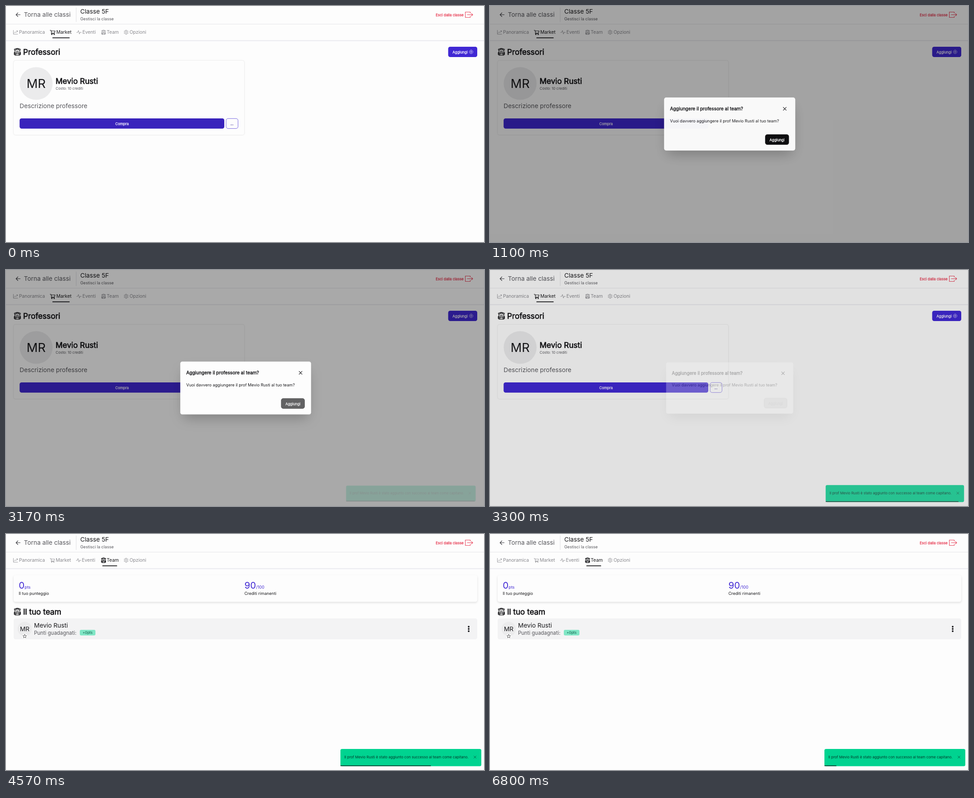
Animation of 1062 by 527 pixels, one loop 6.83 s. Source, as an HTML page:

```html
<!DOCTYPE html>
<html lang="it">
<head>
<meta charset="utf-8">
<title>Classe 5F</title>
<style>
  html, body { margin: 0; width: 100%; height: 100%; overflow: hidden; background: #fdfdfd; }
  svg { display: block; width: 1062px; height: 527px; }
  text { font-family: Inter, "Liberation Sans", sans-serif; white-space: pre; }
  .card { filter: drop-shadow(0 .6px .9px rgba(0, 0, 0, .17)); }
  .raised { filter: drop-shadow(0 2px 2.2px rgba(0, 0, 0, .12)); }
  .btn { filter: drop-shadow(0 .8px .6px rgba(60, 40, 190, .35)); }
</style>
</head>
<body>
<svg id="stage" viewBox="0 0 1062 527" xmlns="http://www.w3.org/2000/svg"></svg>
<script>
const LOOP = 6830, OPEN = 881, PRESS_HOVER = 1510, CLOSE = 3140, SWITCH = 4400;
const TOAST_LIFE = 4000;
const UNIT = 0.572;              // page zoom: one CSS pixel on the stage
const INK = '#18181b', SOFT = '#57575c', MUTED = '#89898e';
const PRIMARY = [64, 40, 212], PRIMARY_HOVER = [57, 35, 188];
const NAME = 'Mevio Rusti';

const rgb = c => `rgb(${c.map(Math.round)})`;
const mix = (a, b, p) => a.map((v, i) => v + (b[i] - v) * p);

// ---- markup helpers ----
function text(x, y, px, str, fill = INK, opts = {}) {
  const size = px * UNIT;
  const bold = opts.bold ? `stroke="${fill}" stroke-width="${(size * 0.042).toFixed(2)}"` : '';
  const id = opts.id ? `id="${opts.id}"` : '';
  return `<text ${id} x="${x}" y="${y}" font-size="${size.toFixed(2)}" fill="${fill}" ${bold}
    text-anchor="${opts.anchor || 'start'}">${str}</text>`;
}
const rect = (x, y, w, h, r, fill, extra = '') =>
  `<rect x="${x}" y="${y}" width="${w}" height="${h}" rx="${r}" fill="${fill}" ${extra}/>`;
const circle = (x, y, r, fill) => `<circle cx="${x}" cy="${y}" r="${r}" fill="${fill}"/>`;
const stroke = (d, color, width, extra = '') =>
  `<path d="${d}" fill="none" stroke="${color}" stroke-width="${width}" ${extra}/>`;

// icons on a 24 unit grid
const ICONS = {
  chart: 'M1 2V22H23M5 16L10 10L14 14L22 5M17 5H22V10',
  cart: 'M0 3H4L7 16H20L23 6H5M7 16L5 19H21M8 21a1.3 1.3 0 1 0 .1 0M19 21a1.3 1.3 0 1 0 .1 0',
  pulse: 'M0 13H5L9 3L14 21L18 11L19.500 13H24',
  bag: 'M8 5V3a2 2 0 0 1 2-2h4a2 2 0 0 1 2 2v2M4 22V10a6 6 0 0 1 6-6h4a6 6 0 0 1 6 6V22a1 1 0 0 1-1 1H5a1 1 0 0 1-1-1Z' +
       'M7 23V16a2 2 0 0 1 2-2h6a2 2 0 0 1 2 2V23M8 10H16M7 18H17M4 14H2V21H4M20 14H22V21H20M4 8L2 4L6 2M20 8L22 4L18 2',
  gear: 'M12 8a4 4 0 1 0 .1 0M10 1.500h4l.7 3 2.600 1.500 3-.9 2 3.500-2.200 2.200v2.600l2.200 2.200-2 3.500-3-.9-2.600 1.500-.7 3h-4' +
        'l-.7-3-2.600-1.500-3 .9-2-3.500 2.200-2.200v-2.600l-2.200-2.200 2-3.500 3 .9 2.600-1.500Z',
  plus: 'M12 2a10 10 0 1 0 .1 0M12 7V17M7 12H17',
  star: 'M12 2L15 9L22.500 9.600L16.800 14.500L18.500 22L12 18L5.500 22L7.200 14.500L1.500 9.600L9 9Z',
  cross: 'M3 3L21 21M21 3L3 21'
};
const icon = (name, x, y, size, color, width = 1.6) =>
  `<g transform="translate(${x} ${y}) scale(${size / 24})">` +
  stroke(ICONS[name], color, width, 'stroke-linejoin="round" stroke-linecap="round"') + '</g>';

// ---- page parts ----
function header() {
  return stroke('M32 19.500H22.500M26.800 15L22.300 19.500L26.800 24', '#3f3f44', 1.2) +
    text(39.7, 24, 24, 'Torna alle classi', SOFT) +
    rect(155.5, 3.5, 1, 32, 0, '#dedee1') +
    text(165, 17.2, 24, 'Classe 5F') +
    text(165, 32, 16, 'Gestisci la classe', SOFT) +
    text(954.7, 22.8, 14, 'Esci dalla classe', '#e8455c', { bold: true }) +
    stroke('M1031.500 16.500V13.500H1020.500V25.500H1031.500V22.500M1024.500 19.500H1037M1033.800 16.300L1037 19.500L1033.800 22.700',
      '#e8455c', 1.1) +
    rect(0, 40, 1062, 1, 0, '#e5e5e9') + rect(0, 76.5, 1062, 1.8, 0, '#e8e8ee');
}

function tabs(active) {
  const market = active === 'Market';
  const items = [
    ['Panoramica', 'chart', 16, 29],
    ['Market', 'cart', 98, market ? 111.7 : 110.4],
    ['Eventi', 'pulse', market ? 157 : 156, market ? 169.7 : 168.5],
    ['Team', 'bag', market ? 211.5 : 211, 223.7],
    ['Opzioni', 'gear', 261.7, 274.5]
  ];
  return items.map(([label, glyph, x, tx]) => {
    const on = label === active, size = on ? 11.5 : 10.5;
    return icon(glyph, x, 58.6 - size / 2, size, on ? INK : MUTED, on ? 2.3 : 1.9) +
      text(tx, 62.4, 18, label, on ? INK : MUTED);
  }).join('') + rect(market ? 103 : 214, 70.2, market ? 38.5 : 33, 1.8, .8, INK);
}

function marketPage() {
  return tabs('Market') +
    icon('bag', 17, 94, 16.5, INK, 2) +
    text(38, 108.8, 30, 'Professori', INK, { bold: true }) +
    rect(982.5, 91, 64.5, 23, 4.6, rgb(PRIMARY), 'class="btn"') +
    text(992, 105.6, 14, 'Aggiungi', '#eeeafd', { bold: true }) +
    icon('plus', 1028.6, 97.6, 9.6, '#eeeafd', 2) +
    rect(17, 122, 512.5, 165.8, 4.6, '#fdfdfd', 'class="card"') +
    circle(67, 173, 36.6, '#ebebec') +
    text(67, 183, 48, 'MR', INK, { anchor: 'middle' }) +
    text(110.3, 174, 30, NAME, INK, { bold: true }) +
    text(110.3, 187, 14, 'Costo: 10 crediti', SOFT) +
    text(30.3, 228, 24, 'Descrizione professore', SOFT) +
    rect(30.3, 251, 454.7, 22.8, 4.6, rgb(PRIMARY), 'class="btn" id="buy"') +
    text(257.7, 266, 14, 'Compra', '#f1eefd', { bold: true, anchor: 'middle' }) +
    rect(489, 251.3, 26.5, 22.3, 4.4, '#fdfdfd', `stroke="${rgb(PRIMARY)}" stroke-width=".7"`) +
    text(502, 266, 14, '...', '#3a2a96', { bold: true, anchor: 'middle' });
}

function teamPage() {
  const accent = rgb(PRIMARY);
  return tabs('Team') +
    rect(17, 92, 1030, 59.5, 4.6, '#fdfdfd', 'class="raised"') +
    text(28.3, 122, 36, '0', accent) + text(41.3, 122, 16, 'pts', accent) +
    text(28.3, 136, 16, 'Il tuo punteggio') +
    text(529.7, 122, 36, '90', accent) + text(555.5, 122, 16, '/100', accent) +
    text(529.7, 136, 16, 'Crediti rimanenti') +
    icon('bag', 17, 165, 16.5, INK, 2) +
    text(38, 179.8, 30, 'Il tuo team', INK, { bold: true }) +
    rect(17, 188.5, 1030, 46.8, 4.6, '#f3f3f4') +
    circle(41.6, 212, 16, '#ebebec') +
    text(41.6, 217, 24, 'MR', INK, { anchor: 'middle' }) +
    circle(41.6, 228.2, 5.6, '#fdfdfd') + icon('star', 36.9, 223.4, 9.4, INK, 1.8) +
    text(62.3, 208.5, 24, NAME) +
    text(62.3, 225.2, 20, 'Punti guadagnati:', SOFT) +
    rect(164, 214, 34.7, 12.6, 3, '#80e6c5') +
    text(181.3, 223.2, 14, '+0pts', '#0b5b48', { anchor: 'middle' }) +
    [207, 212, 217].map(y => circle(1028, y, 1.9, INK)).join('');
}

function toast() {
  return rect(743, 480, 313, 38.5, 3.5, '#00d390') +
    text(751.7, 501.2, 14, `Il prof ${NAME} è stato aggiunto con successo al team come capitano.`, '#04382b') +
    icon('cross', 1038.6, 494.8, 6.8, '#04382b', 2.4) +
    rect(743, 516.7, 313, 1.6, .4, '#0b2a22', 'id="life"');
}

function modal() {
  return rect(393, 225.5, 279, 105, 4.6, 'rgba(0,0,0,.25)', 'filter="url(#blur)"') +
    rect(386, 204, 293, 119, 4.6, '#fdfdfd') +
    text(399.3, 232.8, 18, 'Aggiungere il professore al team?', INK, { bold: true }) +
    icon('cross', 651, 224.8, 9, INK, 2.9) +
    text(399.3, 260.2, 16, `Vuoi davvero aggiungere il prof ${NAME} al tuo team?`) +
    rect(612, 287, 52.6, 22.8, 4.6, '#09090b', 'id="confirm" stroke-width=".6"') +
    text(638.3, 302, 14, 'Aggiungi', '#fff', { bold: true, anchor: 'middle', id: 'confirmLabel' });
}

const stage = document.getElementById('stage');
stage.innerHTML = `
  <defs><filter id="blur" x="-30%" y="-60%" width="160%" height="220%">
    <feGaussianBlur stdDeviation="14.3"/></filter></defs>
  <rect width="1062" height="527" fill="#fdfdfd"/>
  ${header()}
  <g id="market">${marketPage()}</g>
  <g id="team">${teamPage()}</g>
  <g id="toast">${toast()}</g>
  <rect id="backdrop" width="1062" height="527"/>
  <g id="modal">${modal()}</g>`;

const part = {};
stage.querySelectorAll('[id]').forEach(el => part[el.id] = el);

// ---- motion ----
function bezier(x1, y1, x2, y2) {
  const curve = (a, b, s) => 3 * a * s * (1 - s) ** 2 + 3 * b * s * s * (1 - s) + s ** 3;
  return x => {
    if (x <= 0) return 0;
    if (x >= 1) return 1;
    let lo = 0, hi = 1;
    for (let i = 0; i < 24; i++) {
      const mid = (lo + hi) / 2;
      if (curve(x1, x2, mid) < x) lo = mid; else hi = mid;
    }
    return curve(y1, y2, lo);
  };
}
const easeOut = bezier(0, 0, .58, 1);
const snap = bezier(0, 0, .2, 1);
const ramp = (t, start, length, ease = easeOut) => ease((t - start) / length);
const toggle = (t, delay, length) =>
  ramp(t, OPEN + delay, length) - ramp(t, CLOSE + delay, length);

const set = (el, attrs) => Object.entries(attrs).forEach(([k, v]) => el.setAttribute(k, v));
const show = (el, on) => el.setAttribute('display', on ? 'inline' : 'none');
const scaleAt = (x, y, s) => `translate(${x} ${y}) scale(${s}) translate(${-x} ${-y})`;

function render(t) {
  show(part.market, t < SWITCH);
  show(part.team, t >= SWITCH);
  set(part.buy, { fill: rgb(mix(PRIMARY_HOVER, PRIMARY, ramp(t, OPEN, 200, snap))) });

  const open = toggle(t, 0, 300), fade = toggle(t, 50, 200);
  set(part.backdrop, { 'fill-opacity': .4 * open });
  show(part.modal, fade > 0);
  set(part.modal, { opacity: fade, transform: scaleAt(532.5, 263.5, .95 + .05 * open) });

  const hover = ramp(t, PRESS_HOVER, 200, snap), disabled = ramp(t, CLOSE, 200, snap);
  const dark = mix([9, 9, 11], [2, 2, 4], hover);
  set(part.confirm, {
    fill: rgb(mix(dark, [230, 230, 230], disabled)),
    stroke: rgb(mix(dark, [190, 190, 190], disabled))
  });
  const label = rgb(mix([255, 255, 255], [203, 203, 204], disabled));
  set(part.confirmLabel, { fill: label, stroke: label });

  const pop = ramp(t, CLOSE, 250);
  show(part.toast, pop > 0);
  set(part.toast, { opacity: pop, transform: scaleAt(899.5, 499.2, .9 + .1 * pop) });
  const left = Math.min(1, Math.max(0, 1 - (t - CLOSE) / TOAST_LIFE));
  set(part.life, { width: 313 * left });
}

const began = performance.now();
function tick() {
  render((performance.now() - began) % LOOP);
  requestAnimationFrame(tick);
}
tick();
</script>
</body>
</html>
```
